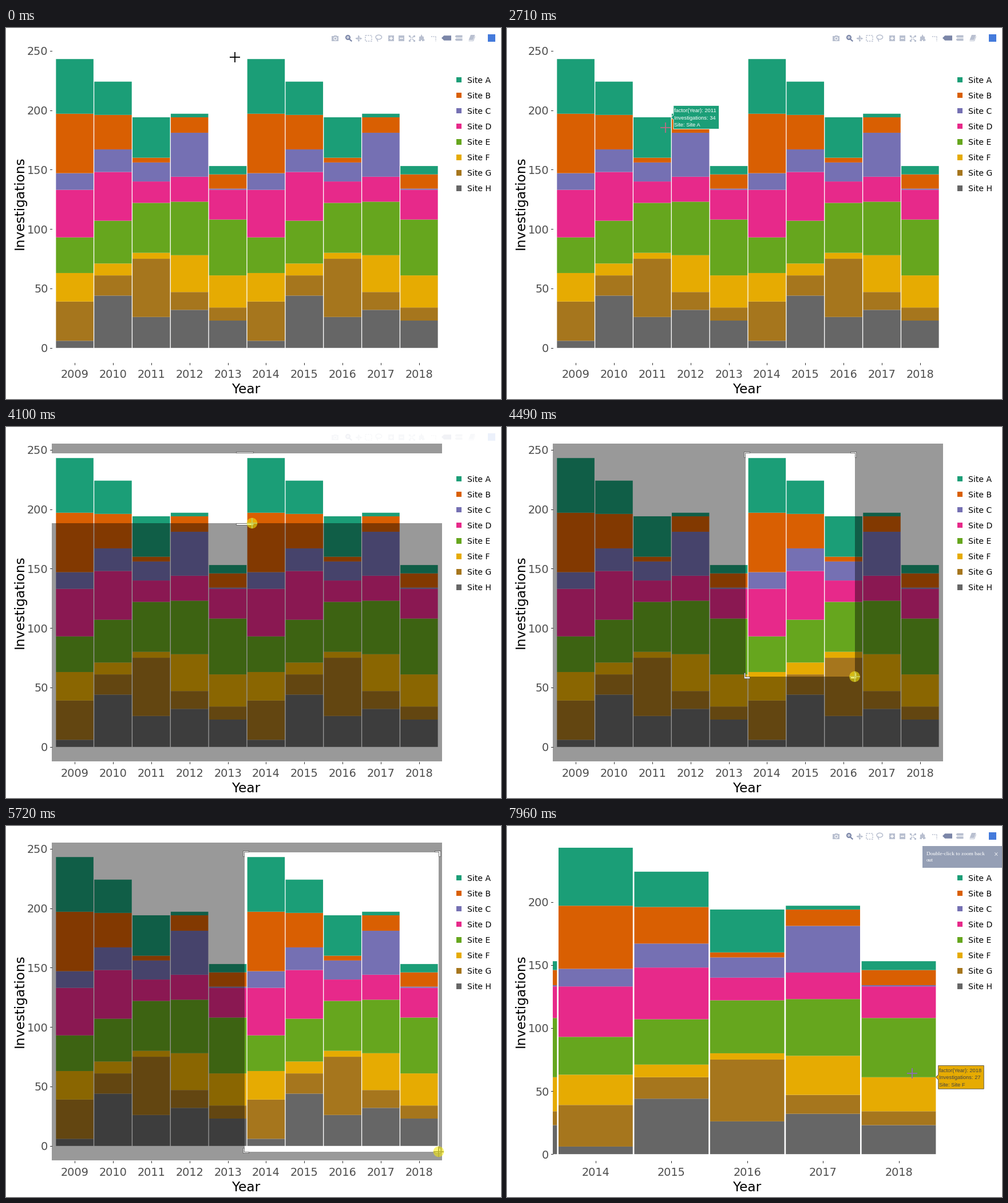
A matplotlib script for the animation above (8000 ms loop, 865 by 648 pixels).

```python
import numpy as np
import matplotlib.pyplot as plt
from matplotlib.animation import FuncAnimation
from matplotlib.collections import PolyCollection
from matplotlib.colors import to_rgb
from matplotlib.patches import Circle, Ellipse, PathPatch, Polygon, Rectangle
from matplotlib.path import Path

W, H, DPI = 865, 648, 100
PT = 72 / DPI                          # points per pixel
FRAMES, INTERVAL, STEP = 200, 40, 77   # poses are held for STEP ms

# plot area and data ranges
L, R, T, B = 80, 762, 29, 584
UX = (R - L) / 10.2                    # pixels per year
V0, UY = -12.15, (B - T) / 267.3       # value at the bottom, pixels per unit
SEL = (416.6, 45.8, 761.0, 569.0)      # area that is zoomed to

COLORS = ["#666666", "#A6761D", "#E6AB02", "#66A61E",
          "#E7298A", "#7570B3", "#D95F02", "#1B9E77"]
SITES = "HGFEDCBA"
COUNTS = [(6, 33, 24, 30, 40, 14, 50, 46),
          (44, 17, 10, 36, 41, 19, 29, 28),
          (26, 49, 5, 42, 18, 16, 4, 34),
          (32, 15, 31, 45, 21, 37, 13, 3),
          (23, 11, 27, 47, 25, 1, 12, 7)]
TOPS = np.cumsum(COUNTS, axis=1)
YEARS = range(2009, 2019)

# pointer path: step, x, y
PATH = np.array([
    (0, 399.5, 51), (2, 397, 53), (3, 397, 53), (6, 350, 70),
    (10, 235, 113), (13, 185, 132), (15, 185, 132), (20, 182, 168),
    (23, 181.5, 192), (25, 181.5, 192), (30, 262, 192), (33, 262, 192),
    (36, 285, 165), (41, 385, 60), (43, 409, 42), (44, 409, 42),
    (48, 416.5, 47), (51, 416.5, 47), (53, 430, 168), (56, 545, 372),
    (60, 670, 500), (63, 699, 525), (71, 744, 567), (76, 764, 570),
    (78, 764, 570), (82, 761, 569), (95, 761, 569), (100, 724, 531),
    (103, 708, 432)])
PRESS, RELEASE = 50, 90

# tooltips: first step, end step, year, site
TIPS = [(11, 21, 2010, "A"), (21, 28, 2010, "B"), (29, 36, 2011, "A"),
        (99, 101, 2018, "H"), (101, 102, 2018, "G"), (102, 104, 2018, "F")]

fig = plt.figure(figsize=(W / 100, H / 100), dpi=DPI, facecolor="white")
ax = fig.add_axes([0, 0, 1, 1])
ax.set(xlim=(0, W), ylim=(H, 0))
ax.axis("off")
plot_clip = Rectangle((L, T), R - L, B - T, transform=ax.transData)


def text(x, y, s, size, color="black", family="DejaVu Sans", **kw):
    return ax.text(x, y, s, fontsize=size * PT, color=color, family=family, **kw)


def line(xs, ys, color, width=1.0, **kw):
    return ax.plot(xs, ys, color=color, lw=width * PT, **kw)[0]


def rect(x, y, w, h, color, **kw):
    return ax.add_patch(Rectangle((x, y), w, h, fc=color, lw=0, **kw))


def to_x(pos, zoomed):
    x = L + (pos - 0.4) * UX
    return L + (x - SEL[0]) * (R - L) / (SEL[2] - SEL[0]) if zoomed else x


def to_y(value, zoomed):
    y = B - (value - V0) * UY
    return T + (y - SEL[1]) * (B - T) / (SEL[3] - SEL[1]) if zoomed else y


def make_view(zoomed):
    boxes, fills, parts = [], [], []
    for n, year in enumerate(YEARS, 1):
        x0, x1 = to_x(n - 0.49, zoomed), to_x(n + 0.49, zoomed)
        low = 0
        for top, color in zip(TOPS[(n - 1) % 5], COLORS):
            y0, y1 = to_y(low, zoomed), to_y(top, zoomed)
            boxes.append([(x0, y0), (x1, y0), (x1, y1), (x0, y1)])
            fills.append(color)
            low = top
        x = to_x(n, zoomed)
        if L < x < R:
            parts.append(text(x, 611, str(year), 19.3, "#4d4d4d", ha="center"))
            parts.append(line([x, x], [B + 0.5, B + 4], "#333333"))
    for v in range(0, 251, 50):
        y = to_y(v, zoomed)
        if y > T:
            parts.append(text(73.5, y + 7.5, str(v), 19.3, "#4d4d4d", ha="right"))
            parts.append(line([L - 3.5, L], [y, y], "#333333"))
    bars = PolyCollection(boxes, facecolors=fills, linewidths=0, snap=False)
    ax.add_collection(bars, autolim=False)
    bars.set_clip_path(plot_clip)
    return parts + [bars]


def draw_modebar():
    pale, dark, cy = "#b9c0d0", "#7b86a8", 17.5

    def mark(x, shape, size, color=pale, y=cy, width=0, **kw):
        ax.plot([x], [y], marker=shape, ms=size * PT, mec=color,
                mew=width * PT, **{"mfc": color, **kw})

    def tag(x, y, w, h, color):
        ax.add_patch(Polygon([(x, y), (x + h, y - h), (x + w, y - h),
                              (x + w, y + h), (x + h, y + h)], fc=color, lw=0))

    # camera, magnifier
    rect(569, 14, 12, 8.5, pale)
    rect(572.5, 12.5, 5, 2, pale)
    mark(575, "o", 5, "white", y=18, width=1.2, mfc=pale)
    mark(597, "o", 7, dark, y=16.3, width=2, mfc="#c9cedb")
    line([599.5, 603.5], [19, 22.5], dark, 2.2)
    # pan, box and lasso select
    mark(616, "+", 10, width=1.5)
    for shape, dx, dy in (("<", -4, 0), (">", 4, 0), ("^", 0, -4), ("v", 0, 4)):
        mark(616 + dx, shape, 4, y=cy + dy)
    ax.add_patch(Rectangle((628, 12.5), 11, 10, fc="none", ec=pale, lw=1.1,
                           ls=(0, (1.6, 1.1))))
    ax.add_patch(Ellipse((651.3, 16), 10.5, 7.5, fc="none", ec=pale, lw=1.1))
    line([648, 649.5], [19, 23], pale, 1.5)
    # zoom in, zoom out, autoscale
    for x, sign in ((673.3, "+"), (691, "_")):
        mark(x, "s", 10.3)
        mark(x, sign, 6, "white", width=1.6)
    mark(709, "x", 10, width=1.5)
    mark(709, "s", 2.5, "white")
    for dx in (-4, 4):
        for dy in (-4, 4):
            mark(709 + dx, "s", 3, y=cy + dy)
    # home
    mark(726.3, "^", 11, y=16)
    mark(726.3, "s", 7.5, y=19)
    mark(726.3, "s", 2.4, "white", y=21.5)
    # spike lines, hover modes, sheets
    dots = (0, (1.2, 1))
    line([743, 751], [14.5, 14.5], pale, 1.6, ls=dots)
    line([751, 751], [14.5, 22.5], pale, 1.6, ls=dots)
    tag(761, cy, 17, 4.3, dark)
    for dy in (-2.8, 2.8):
        tag(784.5, cy + dy, 13, 2.1, pale)
    ax.add_patch(Polygon([(808.5, 21), (812, 12), (819.5, 12), (816, 21)],
                         fc=pale, lw=0))
    line([809, 816.5, 819.5], [22.5, 22.5, 15], pale)
    rect(842, 11, 13, 13, "#447adb")


def draw_labels():
    text(420, 638, "Year", 23.2, ha="center")
    text(31, 305.5, "Investigations", 23.2, ha="center", rotation=90,
         rotation_mode="anchor")
    for n, (site, color) in enumerate(zip(SITES[::-1], COLORS[::-1])):
        y = 90.7 + 27.05 * n
        rect(787, y - 4.6, 9.3, 9.2, color)
        text(806, y + 5.3, "Site " + site, 14)


views = [make_view(False), make_view(True)]
draw_labels()
draw_modebar()
veil = rect(564, 8, 298, 20, "white", zorder=3)

# zoom box: dimmed surroundings and handles
dim = ax.add_patch(PathPatch(Path([(0, 0)]), fc="black", alpha=0.4, lw=0, zorder=4))
grips = PolyCollection([], facecolors="white", edgecolors="#444444",
                       linewidths=0.7 * PT, zorder=5)
ax.add_collection(grips, autolim=False)

# tooltip
tip_box = ax.add_patch(Polygon([(0, 0), (1, 1), (0, 1)], lw=0.8 * PT, zorder=6))
tip_lines = [text(0, 0, "", 9.3, family="Liberation Sans", zorder=7) for _ in range(3)]

# notice
notice = rect(726, 35, W - 726, 37.5, "#8c97af", zorder=6)
serif = dict(color="white", family="Liberation Serif", zorder=7)
notice_text = [text(733, 51, "Double-click to zoom back", 9.4, **serif),
               text(733, 62.5, "out", 9.4, **serif),
               text(855, 55, "\u00d7", 13.5, ha="center", **serif)]

# pointer
cross = line([0], [0], "black", 1.8, zorder=8, solid_capstyle="butt")
glow = ax.add_patch(Circle((0, 0), 9.3, fc=(0.97, 0.92, 0.05), alpha=0.58,
                           lw=0, zorder=9))


def selection(x, y):
    """Zoom box (x0, y0, x1, y1) and handle polygons while dragging."""
    px, py = SEL[:2]
    x, y = min(x, R), min(y, B)
    w, h = abs(x - px), abs(y - py)
    if max(w, h) < 6:
        return None
    o, i, n = -2.5, -0.4, 7.2
    if w < min(0.6 * h, 14):
        bars = [[(px - 15, a), (px + 15, a), (px + 15, b), (px - 15, b)]
                for a, b in ((py + o, py + i), (y - i, y - o))]
        return (L, py, R, y), bars
    bracket = np.array([(o, n), (o, o), (n, o), (n, i), (i, i), (i, n)])
    corners = [bracket * (sx, sy) + (cx, cy)
               for cx, sx in ((px, 1), (x, -1)) for cy, sy in ((py, 1), (y, -1))]
    return (px, py, x, y), corners


def pointer_color(x, y, zoomed, box):
    """Inverse of what lies under the pointer."""
    if zoomed:
        x = SEL[0] + (x - L) * (SEL[2] - SEL[0]) / (R - L)
        y = SEL[1] + (y - T) * (SEL[3] - SEL[1]) / (B - T)
    pos, value = (x - L) / UX + 0.4, (B - y) / UY + V0
    n = round(pos)
    base, mix = np.ones(3), 1
    if 1 <= n <= 10 and abs(pos - n) < 0.49 and value > 0:
        s = np.searchsorted(TOPS[(n - 1) % 5], value)
        if s < len(COLORS):
            base, mix = np.array(to_rgb(COLORS[s])), 0.78
    if box and not (box[0] <= x < box[2] and box[1] <= y < box[3]):
        base = base * 0.6
    return mix * (1 - base) + (1 - mix) * base


def show_tip(k, zoomed):
    tip = next((t for t in TIPS if t[0] <= k < t[1]), None)
    for part in [tip_box, *tip_lines]:
        part.set_visible(tip is not None)
    if tip is None:
        return
    year, site = tip[2:]
    n, s = year - YEARS[0] + 1, SITES.index(site)
    row = (n - 1) % 5
    x, y = to_x(n + 0.49, zoomed), to_y(TOPS[row, s], zoomed)
    a, w, h = 4.3, 79.5, 20.4
    x0, x1 = x + a, x + a + w
    tip_box.set_xy([(x, y), (x0, y + a), (x0, y + h), (x1, y + h),
                    (x1, y - h), (x0, y - h), (x0, y - a)])
    light = np.dot(to_rgb(COLORS[s]), (0.299, 0.587, 0.114)) > 0.5
    ink = "#444444" if light else "white"
    tip_box.set(facecolor=COLORS[s], edgecolor=ink)
    words = (f"factor(Year): {year}", f"Investigations: {COUNTS[row][s]}",
             f"Site: Site {site}")
    for j, (label, word) in enumerate(zip(tip_lines, words)):
        label.set(position=(x + 5.8, y + 3.6 + 12.2 * (j - 1)), text=word, color=ink)


def update(frame):
    k = (frame * INTERVAL + 15) // STEP
    x, y = (np.interp(k, PATH[:, 0], PATH[:, c]) for c in (1, 2))
    zoomed, held = k >= RELEASE, PRESS <= k < RELEASE

    for view, on in zip(views, (not zoomed, zoomed)):
        for part in view:
            part.set_visible(on)

    picked = selection(x, y) if held else None
    box = None
    dim.set_visible(picked is not None)
    grips.set_visible(picked is not None)
    if picked:
        box, handles = picked
        x0, y0, x1, y1 = box
        outer = [(L, T), (R, T), (R, B), (L, B), (L, T)]
        inner = [(x0, y0), (x0, y1), (x1, y1), (x1, y0), (x0, y0)]
        codes = [Path.MOVETO] + [Path.LINETO] * 3 + [Path.CLOSEPOLY]
        dim.set_path(Path(outer + inner, codes * 2))
        grips.set_verts(handles)

    show_tip(k, zoomed)
    bar = np.interp(k, [50, 51, 53, 54, 90, 94], [1, 0.9, 0.1, 0, 0, 1])
    veil.set_alpha(1 - bar)

    u = np.clip((k - RELEASE) / 9, 0, 1)
    fade = u * u * (3 - 2 * u)
    notice.set_alpha(0.92 * fade)
    for label in notice_text:
        label.set_alpha(fade)

    cross.set_data([x - 9, x + 9, np.nan, x, x], [y, y, np.nan, y - 9, y + 9])
    cross.set_color(pointer_color(x, y, zoomed, box))
    glow.set_center((x, y))
    glow.set_visible(held)
    return []


anim = FuncAnimation(fig, update, frames=FRAMES, interval=INTERVAL,
                     init_func=lambda: update(0), repeat=True, blit=False)
plt.show()
```
